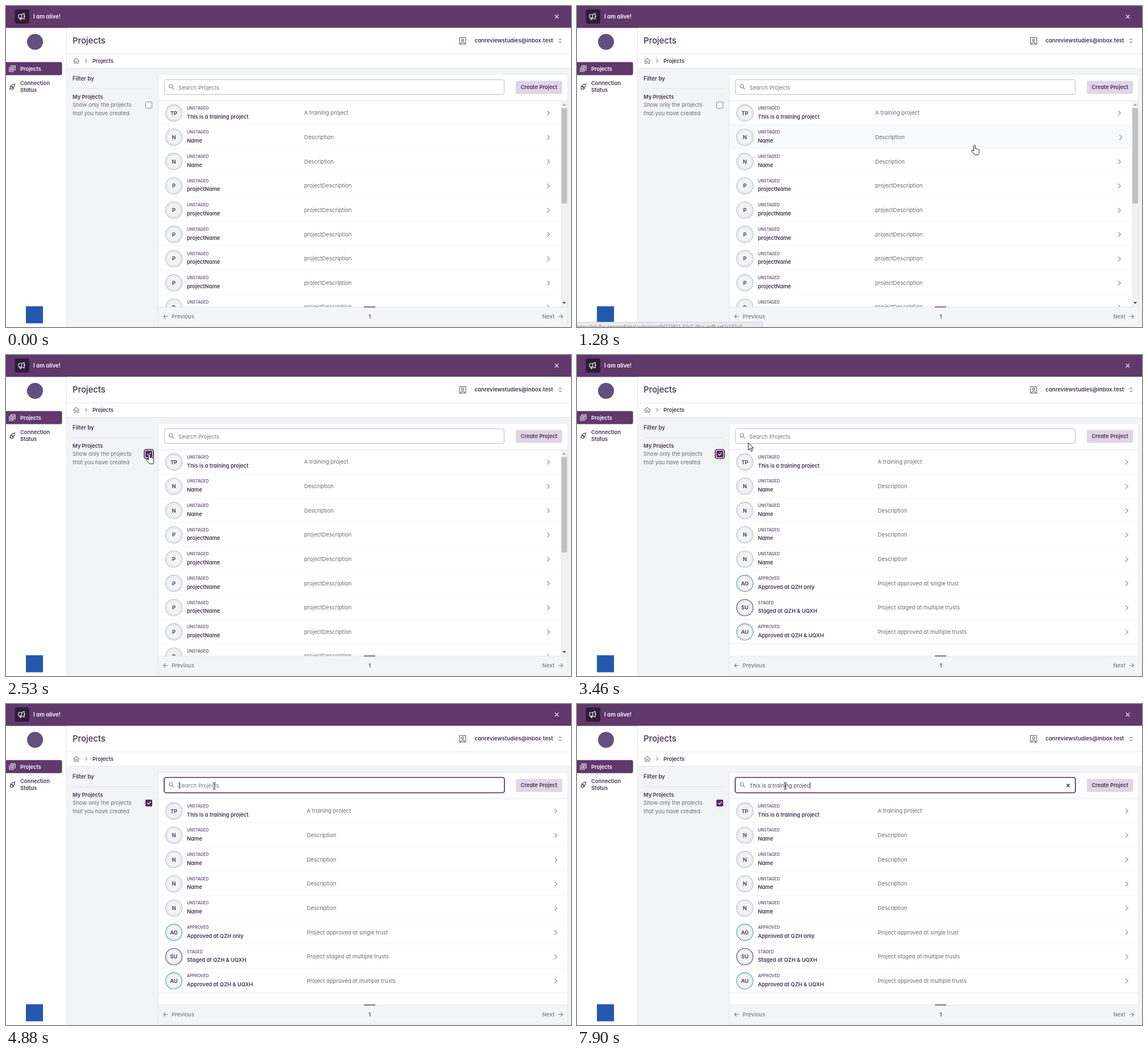
These frames come from a looping animation (993 px wide and 564 px high, 8 s). An HTML page:

```html
<!DOCTYPE html>
<html lang="en">
<head>
<meta charset="utf-8">
<title>Projects</title>
<style>
  html, body { margin: 0; width: 100%; height: 100%; overflow: hidden; background: #f3f4f6; }
  #stage { display: block; width: 993px; height: 564px; }
  text { font: 400 9.6px Inter, "Open Sans", sans-serif; font-feature-settings: "cv11"; fill: #6b6873; white-space: pre; }
  .bold { font-weight: 600; font-size: 9.3px; fill: #46344f; }
  .title { font-weight: 500; font-size: 14.8px; fill: #41304b; }
  .white { fill: #fff; }
  .status { font-weight: 600; font-size: 7px; fill: #6d5577; }
  .page { font-weight: 500; fill: #7a7881; }
  .url { font: 8.3px "Open Sans", "Noto Sans", sans-serif; fill: #74787e; }
  .mid { text-anchor: middle; }
  .end { text-anchor: end; }
  .icon { fill: none; stroke-width: 1.1; stroke-linecap: round; stroke-linejoin: round; }
  .gray { stroke: #85838c; }
  .rule { fill: #e3e5e9; }
  .cursor { fill: #fff; stroke: #1d1624; stroke-width: 1; stroke-linejoin: round; }
</style>
</head>
<body>
<svg id="stage" viewBox="0 0 993 564">
  <defs>
    <clipPath id="listArea"><rect x="268" y="166" width="719" height="363"/></clipPath>
  </defs>
  <rect width="993" height="564" fill="#f3f4f6"/>

  <!-- Sidebar -->
  <rect y="38" width="106" height="526" fill="#fff"/>
  <rect class="rule" x="106" y="38" width="1" height="526"/>
  <circle cx="51" cy="63" r="14" fill="#62507f"/>
  <path d="M0 98.500H95.500a3 3 0 0 1 3 3V118.500a3 3 0 0 1-3 3H0z" fill="#60386b"/>
  <g class="icon" stroke="#fff">
    <path d="M8.500 105h7.500v7.500h-7.500zM6 107.500v7.500h7.500M10.500 107.300h3.500M10.500 109h3.500M10.500 110.700h2"/>
  </g>
  <text class="bold white" x="25" y="113.700">Projects</text>
  <path class="icon" stroke="#41304b" d="M8.500 140l4.800 4.800-1.500 1.200c-2 1.500-5.500-2-4.300-4.300zM10.200 139.200l1.400-1.300c2-1.300 4.500 1.300 3.300 3.300l-1.300 1.500M6.700 146l1.300-1.300M14.700 137.700l1.300-1.200M9.700 142.500l1.500-1.500M11.500 144l1.300-1.400"/>
  <text class="bold" x="25" y="139.300">Connection</text>
  <text class="bold" x="25" y="151.300">Status</text>
  <rect x="35" y="527.500" width="30" height="30" fill="#2358b0"/>

  <!-- Banner -->
  <rect width="993" height="38.500" fill="#60386b"/>
  <rect x="15.500" y="6" width="25.500" height="25" rx="4" fill="#301b38"/>
  <path class="icon" stroke="#fff" d="M23 15h4.500l4.500-2v10l-4.500-2H23a1 1 0 0 1-1-1v-4a1 1 0 0 1 1-1zM27.500 15v6M24 21l1 3h1.700l-.7-3M32 16.500q2 1.500 0 3"/>
  <text class="bold white" style="font-size:9.7px" x="48" y="22">I am alive!</text>
  <path class="icon" stroke="#fff" stroke-width="1.200" d="M965 15.700l6 6M971 15.700l-6 6"/>

  <!-- Header -->
  <rect x="107" y="38.500" width="886" height="71" fill="#fff"/>
  <rect class="rule" x="107" y="83.500" width="886" height="1"/>
  <rect class="rule" x="107" y="109" width="886" height="1"/>
  <text class="title" x="117" y="66">Projects</text>
  <path class="icon" stroke="#62566a" d="M797 55.500h11v11.500h-11zM798.800 67c0-4 7.400-4 7.400 0M804.500 59.800a2 2 0 1 1-4 0a2 2 0 1 1 4 0"/>
  <text class="bold end" style="font-size:9.6px" x="961.500" y="64.300">canreviewstudies@inbox.test</text>
  <path class="icon gray" stroke-width=".9" d="M971.800 59.600l2-2 2 2M971.800 62.600l2 2 2-2"/>
  <path class="icon gray" stroke-width=".9" d="M118.500 96.500l5-4.700 5 4.700M119.800 95.500v5.500h2.500v-3.500h2.500v3.500h2.500v-5.500"/>
  <path class="icon gray" d="M139.500 93.700l2.700 2.600-2.700 2.600"/>
  <text class="bold" x="152" y="99.700">Projects</text>

  <!-- Filter -->
  <text class="bold" style="font-size:9.700px" x="117" y="130.700">Filter by</text>
  <rect class="rule" x="117" y="145" width="140" height="1"/>
  <text class="bold" x="117" y="163">My Projects</text>
  <text x="117" y="177.300">Show only the projects</text>
  <text x="117" y="192">that you have created</text>
  <rect id="ring" x="243" y="166" width="16" height="16" rx="3.500" fill="#fff" stroke="#41264c" stroke-width="1.700"/>
  <rect x="245.500" y="168.500" width="11" height="11" rx="1.500" fill="#fff" stroke="#85838c"/>
  <g id="checked">
    <rect x="245" y="168" width="12" height="12" rx="2" fill="#512d5e"/>
    <path class="icon" stroke="#fff" stroke-width="1.500" d="M248.300 174.200l2 2 4-4.300"/>
  </g>

  <!-- Project card -->
  <rect x="267.500" y="120" width="720" height="442" rx="5" fill="#fff" stroke="#e3e5e9"/>
  <rect x="278.500" y="129.500" width="597" height="26" rx="3" fill="#fff" stroke="#b9bbc2"/>
  <rect id="focus" x="278" y="129" width="598" height="27" rx="3.500" fill="none" stroke="#5a3567" stroke-width="1.700"/>
  <path class="icon gray" d="M292.800 141a3 3 0 1 1-6 0a3 3 0 1 1 6 0M292 143.300l3 3"/>
  <text id="query" x="303" y="146.500"></text>
  <rect id="caret" y="137" width="1" height="12" fill="#2a2030"/>
  <path id="clear" class="icon" stroke="#2c2233" style="stroke-width:1.600" d="M861 141l4.200 4.200M865.200 141l-4.200 4.200"/>
  <rect x="896" y="131.500" width="81.500" height="23" rx="3" fill="#e2d4e7"/>
  <text class="bold mid" x="936.700" y="146.200">Create Project</text>

  <g clip-path="url(#listArea)">
    <g id="allProjects"></g>
    <g id="myProjects"></g>
  </g>
  <rect class="rule" x="268" y="166" width="719" height="1"/>

  <!-- Pagination -->
  <path d="M268 529H987V557a5 5 0 0 1-5 5H273a5 5 0 0 1-5-5z" fill="#f4f5f6"/>
  <rect class="rule" x="268" y="528.500" width="719" height="1"/>
  <rect x="629" y="528" width="20" height="1.500" fill="#684074"/>
  <path class="icon gray" d="M284.500 545.500h-7.500M280 542.500l-3 3 3 3M971 545.500h7.500M975.500 542.500l3 3-3 3"/>
  <text class="page" x="291" y="548.700">Previous</text>
  <text class="page mid" style="fill:#41304b" x="639.300" y="548.700">1</text>
  <text class="page end" x="964" y="548.700">Next</text>

  <!-- Link preview -->
  <g id="link">
    <path d="M-1 555.500H324a3 3 0 0 1 3 3V565H-1z" fill="#e9eaed" stroke="#d3d5d9"/>
    <text id="url" class="url" x="-2" y="567"></text>
  </g>

  <g id="pointer">
    <path id="arrow" class="cursor" d="M0 0V13L3 10.300L5.300 15L7.500 14L5.300 9.500H9.300Z"/>
    <path id="hand" class="cursor" d="M-1.500 1.500q1.400-2.200 2.800 0V7q1.300-1 2.200.3q1.300-.8 2.200.5q1.800-.5 2 1.200V13q0 2.500-1.500 4.700H0Q-3 14-5.300 11q-.4-2 1.500-1.700L-1.500 11Z"/>
    <path id="beam" fill="none" stroke="#1d1624" d="M-2.500-5.500h2l.5.500.5-.5h2M0-5v10M-2.500 5.500h2l.5-.5.5.5h2"/>
  </g>
</svg>
<script>
const LOOP = 8000, ROW = 42.65, LIST_TOP = 166;
const $ = id => document.getElementById(id);
const show = (id, on) => $(id).setAttribute('visibility', on ? 'visible' : 'hidden');
const clamp = v => Math.max(0, Math.min(1, v));
const fade = (id, t, from, to, length) =>
  $(id).setAttribute('opacity', Math.min(clamp((t - from) / length), 1 - clamp((t - to) / length)));

const ringColor = { UNSTAGED: '#b0b3bb', APPROVED: '#4c9b8c', STAGED: '#51415f' };
const training = ['TP', 'UNSTAGED', 'This is a training project', 'A training project'];
const named = ['N', 'UNSTAGED', 'Name', 'Description'];
const generic = ['P', 'UNSTAGED', 'projectName', 'projectDescription'];
const allProjects = [training, named, named, ...Array(6).fill(generic)];
const myProjects = [training, named, named, named, named,
  ['AO', 'APPROVED', 'Approved at QZH only', 'Project approved at single trust'],
  ['SU', 'STAGED', 'Staged at QZH &amp; UQXH', 'Project staged at multiple trusts'],
  ['AU', 'APPROVED', 'Approved at QZH &amp; UQXH', 'Project approved at multiple trusts']];

const rowsMarkup = (rows, right, descX, chevronX) => rows.map(([initials, status, name, desc], i) => `
  <g class="row" transform="translate(0 ${LIST_TOP + i * ROW})">
    <rect class="back" x="268" y="0" width="${right - 268}" height="${ROW}" fill="#fff"/>
    <rect class="rule" x="268" y="${ROW - .4}" width="${right - 268}" height="1"/>
    <circle cx="295" cy="22" r="14.400" fill="#fff" stroke="${ringColor[status]}" stroke-width="1.100"/>
    <circle cx="295" cy="22" r="12.300" fill="#f2f3f5" stroke="#cfd2d9" stroke-width=".8"/>
    <text class="bold mid" x="295" y="25.500">${initials}</text>
    <text class="status" x="318" y="15.700">${status}</text>
    <text class="bold" x="318" y="31.500">${name}</text>
    <text x="${descX}" y="25.300">${desc}</text>
    <path class="icon gray chevron" d="M${chevronX} 18.500l3.700 3.700-3.700 3.700"/>
  </g>`).join('');

$('allProjects').innerHTML = rowsMarkup(allProjects, 975, 524, 951.5) + `
  <rect x="975" y="166" width="12" height="363" fill="#f1f1f2"/>
  <rect x="976" y="179.500" width="10" height="167.500" fill="#c1c1c1"/>
  <path d="M978 175l3-3.500 3 3.500z" fill="#a3a3a3"/>
  <path d="M978 520l3 3.500 3-3.500z" fill="#444"/>`;
$('myProjects').innerHTML = rowsMarkup(myProjects, 987, 528.5, 964.5);
const hoverRows = [...$('allProjects').querySelectorAll('.row')];

// Pointer path: time, x, y
const path = [[330, 833, 560], [520, 833, 480], [810, 836, 256], [1070, 836, 255], [1140, 820, 255],
  [1280, 700, 244], [1470, 490, 212], [1690, 239, 164], [1765, 239, 164], [1910, 252, 173.5],
  [3459, 252, 173.5], [3460, 301, 154], [3530, 301, 154], [3660, 357, 144], [3800, 366, 144], [LOOP, 366, 144]];

const phrase = 'This is a training projec';
const keyTimes = [4950, 5020, 5220, 5480, 5750, 5900, 5990, 6100, 6100, 6230, 6360, 6490, 6690,
  6820, 6820, 7020, 7100, 7220, 7290, 7490, 7570, 7640, 7720, 7820, 7900];

function pointerAt(t) {
  const i = path.findIndex(p => p[0] > t);
  if (i < 1) return path[0].slice(1);
  const [t0, x0, y0] = path[i - 1], [t1, x1, y1] = path[i];
  const k = (t - t0) / (t1 - t0);
  return [x0 + (x1 - x0) * k, y0 + (y1 - y0) * k];
}

function drawPointer(t) {
  const [x, y] = pointerAt(t);
  const visible = t >= 330;
  const inRows = x > 268 && y > LIST_TOP && y < 529;
  const onBox = x > 242 && x < 261 && y > 164 && y < 184;
  const shape = inRows || onBox ? 'hand' : x > 278 && y > 129 && y < 152 ? 'beam' : 'arrow';
  $('pointer').setAttribute('transform', `translate(${x} ${y})`);
  for (const id of ['hand', 'beam', 'arrow']) show(id, visible && id === shape);
  return visible && inRows ? Math.floor((y - LIST_TOP) / ROW) : -1;
}

function drawHover(row) {
  hoverRows.forEach((el, i) => {
    const on = i === row;
    el.querySelector('.back').setAttribute('fill', on ? '#f8f9fa' : '#fff');
    el.querySelector('.chevron').setAttribute('transform', `translate(${on ? 2.5 : 0} 0)`);
  });
}

function drawSearch(t) {
  const typed = phrase.slice(0, keyTimes.filter(k => k <= t).length).replace(/ /g, '\u00a0');
  const query = $('query');
  query.textContent = typed || 'Search Projects';
  query.style.fill = typed ? '#4c4354' : '#77747e';
  $('caret').setAttribute('x', typed ? 303 + query.getComputedTextLength() : 304);
  show('caret', t >= 3820 && !(t >= 4350 && t < 4880));
  show('clear', typed);
  fade('focus', t, 3800, LOOP, 140);
}

function render(t) {
  drawHover(drawPointer(t));
  drawSearch(t);
  show('allProjects', t < 2790);
  show('myProjects', t >= 2790);
  fade('ring', t, 1640, 3800, 60);
  fade('checked', t, 1990, LOOP, 150);
  show('link', t >= 400 && t < 1910);
  const id = t < 1200 ? 'dd226eff-557c-454f-baea-a3896595f7' : 'fd222831-32e7-48cc-aef8-cef2c132a3';
  $('url').textContent = `https://sit-flip.answerdigital.io/project/${id}`;
}

const start = performance.now();
function tick() {
  render((performance.now() - start) % LOOP);
  requestAnimationFrame(tick);
}
tick();
</script>
</body>
</html>
```
